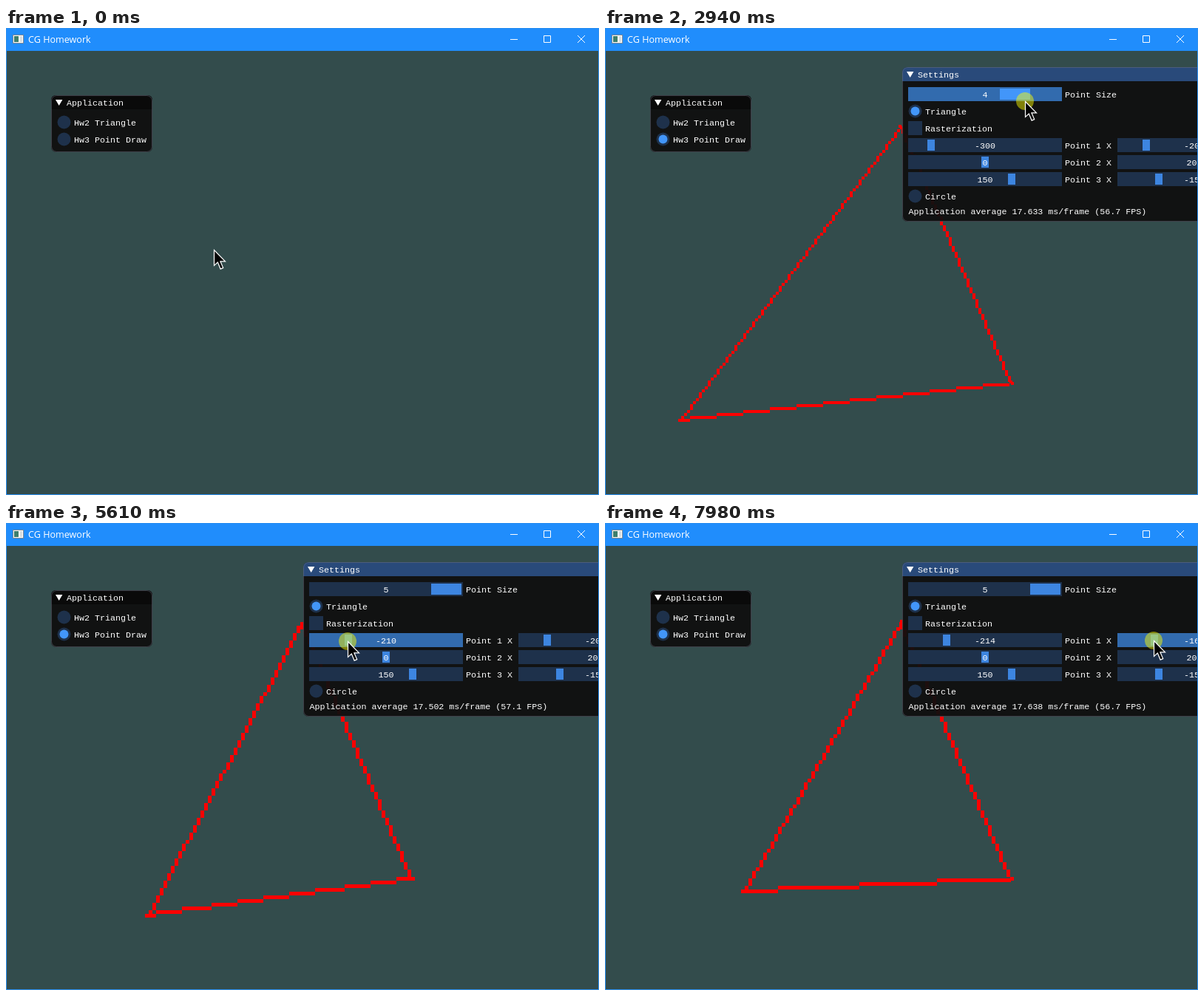
Write an HTML page that moves like this. It is 802 by 632 pixels and loops after 8 s.

```html
<!DOCTYPE html>
<html lang="en">
<head>
<meta charset="utf-8">
<title>CG Homework</title>
<style>
  html, body { margin: 0; width: 100%; height: 100%; overflow: hidden; background: #334c4c; }
  svg { display: block; width: 802px; height: 632px; }
  .mono { font: 11.667px "Liberation Mono", "Courier New", monospace; fill: #fff; white-space: pre; }
  .caption { font: 12.6px "Open Sans", "Noto Sans", sans-serif; fill: #fff; }
</style>
</head>
<body>
<svg id="stage" viewBox="0 0 802 632" xmlns="http://www.w3.org/2000/svg"></svg>
<script>
const LOOP = 8000, STEP = 156.5;
const LAG = 0.29; // a dragged slider trails the pointer by this part of a step
const FRAME = '#1e314b', HOVER = '#25476f', ACTIVE = '#326bae';
const GRAB = '#3d85e0', BRIGHT = '#4296fa';

const stage = document.getElementById('stage');

function add(parent, tag, attrs, text) {
  const el = document.createElementNS('http://www.w3.org/2000/svg', tag);
  for (const key in attrs) el.setAttribute(key, attrs[key]);
  if (text !== undefined) el.textContent = text;
  parent.appendChild(el);
  return el;
}
const rect = (p, x, y, width, height, fill, more) =>
  add(p, 'rect', { x, y, width, height, fill, ...more });
const label = (p, x, y, text, more) => add(p, 'text', { x, y, class: 'mono', ...more }, text);
const set = (el, key, value) => el.setAttribute(key, value);
const show = (el, on) => set(el, 'visibility', on ? 'visible' : 'hidden');

// Every control registers its hover area here.
const controls = [];
function control(el, x, y, w, inSettings) {
  const c = { el, x, y, w, h: 19, inSettings };
  controls.push(c);
  return c;
}

function panel(x, y, w, h, title, color) {
  const g = add(stage, 'g', {});
  rect(g, x, y, w, h, '#0f0f0f', { rx: 7, opacity: 0.94 });
  add(g, 'path', { fill: color, d: `M${x} ${y + 19}v-12q0 -7 7 -7h${w - 14}q7 0 7 7v12z` });
  rect(g, x + 0.5, y + 0.5, w - 1, h - 1, 'none', { rx: 7, stroke: '#6e6e80', 'stroke-opacity': 0.5 });
  add(g, 'path', { fill: '#fff', d: `M${x + 6} ${y + 6}h9.4l-4.7 8z` });
  label(g, x + 21, y + 14, title);
  return g;
}

function radio(g, x, y, text, width, inSettings) {
  const ring = add(g, 'circle', { cx: x + 9.5, cy: y + 9.5, r: 9, fill: FRAME });
  const dot = add(g, 'circle', { cx: x + 9.5, cy: y + 9.5, r: 6, fill: BRIGHT });
  label(g, x + 23, y + 14, text);
  control(ring, x, y, width, inSettings);
  return dot;
}

function slider(g, x, y, value, min, max, grabWidth = 10) {
  const room = 204 - grabWidth;
  const bar = rect(g, x, y, 208, 19, FRAME);
  const grab = rect(g, x, y + 2, grabWidth, 15, GRAB, { 'shape-rendering': 'crispEdges' });
  const text = label(g, x + 104, y + 14, '', { 'text-anchor': 'middle' });
  const c = control(bar, x, y, 208, true);
  c.grab = grab;
  c.start = value;
  c.put = v => {
    c.value = v;
    set(grab, 'x', x + 2 + (v - min) / (max - min) * room);
    text.textContent = v;
  };
  c.valueAt = px => {
    const part = (px - x - 2 - grabWidth / 2) / room;
    return Math.round(min + Math.max(0, Math.min(1, part)) * (max - min));
  };
  c.put(value);
  return c;
}

// Scene
rect(stage, 0, 0, 802, 632, '#334c4c');
const lines = add(stage, 'path', { fill: '#f00', 'shape-rendering': 'crispEdges' });

const app = panel(61, 91, 137, 77, 'Application', '#0a0a0a');
show(radio(app, 69, 118, 'Hw2 Triangle', 107), false);
const drawDot = radio(app, 69, 141, 'Hw3 Point Draw', 121);

const settings = panel(402, 53, 520, 209, 'Settings', '#294a7a');
const sizeBar = slider(settings, 410, 80, 1, 1, 5, 40.8);
label(settings, 622, 94, 'Point Size');
radio(settings, 410, 103, 'Triangle', 79, true);
control(rect(settings, 410, 126, 19, 19, FRAME), 410, 126, 114, true);
label(settings, 433, 140, 'Rasterization');
const corners = [[-300, -200], [0, 200], [150, -150]].map(([px, py], i) => {
  const y = 149 + 23 * i;
  label(settings, 622, y + 14, `Point ${i + 1} X`);
  return [slider(settings, 410, y, px, -400, 400), slider(settings, 693, y, py, -300, 300)];
});
show(radio(settings, 410, 218, 'Circle', 65, true), false);
const stats = label(settings, 410.5, 252, '');

// Window frame
rect(stage, 0, 0, 802, 31, '#208dfc');
rect(stage, 0.5, 0.5, 801, 631, 'none', { stroke: '#2b8ff0' });
rect(stage, 9.5, 9.5, 14, 11, '#fff', { stroke: '#7b8794' });
rect(stage, 11, 11, 6, 8, '#3f7f6c');
rect(stage, 19, 11, 3, 8, '#d8dde0');
add(stage, 'text', { x: 30, y: 20, class: 'caption' }, 'CG Homework');
add(stage, 'path', {
  d: 'M682 15.5h10M727.5 10.5h9v9h-9zM773 10l10 10M783 10l-10 10', fill: 'none', stroke: '#fff'
});

const halo = add(stage, 'circle', { r: 12, fill: '#ff0', 'fill-opacity': 0.47 });
const pointer = add(stage, 'path', {
  d: 'M0 0V21L4.8 16.6L8.6 25.6L12.2 24.1L8.4 15.3H15Z',
  fill: '#000', stroke: '#fff', 'stroke-width': 1.2
});

// Pointer stops: step, x, y
const path = [
  [1, 281, 300], [4, 92, 152], [6, 92, 152], [11, 423, 152],
  [17, 440, 92], [19, 568, 99], [21, 602, 94],
  [25, 441.25, 156], [26, 441.25, 156], [29, 492, 156], [31.5, 500, 157],
  [35, 476, 160], [35.6, 463.6, 160], [36, 462, 160], [39, 462, 160],
  [41.5, 732.3, 159], [43, 734, 159], [45, 776, 160], [47, 782, 160], [49, 749, 160], [51, 742, 159]
];
const frameTime = [[11, 17.364], [19, 17.633], [29, 17.077], [36, 17.502], [45, 18.056], [51, 17.638]];
const drags = [
  { bar: sizeBar, from: 17, to: 21 },
  { bar: corners[0][0], from: 26, to: 38 },
  { bar: corners[0][1], from: 42, to: 51 }
];

function at(keys, n, col = 1) {
  const next = keys.findIndex(k => k[0] >= n);
  if (next < 0) return keys[keys.length - 1][col];
  if (next === 0) return keys[0][col];
  const a = keys[next - 1], b = keys[next];
  return a[col] + (b[col] - a[col]) * (n - a[0]) / (b[0] - a[0]);
}

// Bresenham walk in blocks of the point size
function edge([x0, y0], [x1, y1], size) {
  const dx = x1 - x0, dy = y1 - y0;
  const flat = Math.abs(dx) >= Math.abs(dy);
  const long = Math.max(Math.abs(dx), Math.abs(dy));
  const short = Math.min(Math.abs(dx), Math.abs(dy));
  let d = '';
  for (let i = 0; i * size < long; i++) {
    const j = i ? Math.ceil((i + 1) * short / long - 0.5) : 0;
    const x = x0 + Math.sign(dx) * size * (flat ? i : j);
    const y = y0 + Math.sign(dy) * size * (flat ? j : i);
    d += `M${x - Math.ceil(size / 2)} ${y - Math.floor(size / 2)}h${size}v${size}h${-size}z`;
  }
  return d;
}

function draw(n) {
  const x = at(path, n), y = at(path, n, 2);
  const open = n >= 6;
  let held = null;

  for (const { bar, from, to } of drags) {
    bar.put(n < from ? bar.start : bar.valueAt(at(path, Math.min(n, to) - LAG)));
    if (n >= from && n <= to) held = bar;
  }

  for (const el of [drawDot, settings, lines]) show(el, open);
  show(halo, held || n === 5);
  set(halo, 'cx', x);
  set(halo, 'cy', y);
  set(pointer, 'transform', `translate(${x + 0.5} ${y + 0.5})`);

  for (const c of controls) {
    const over = !held && (open || !c.inSettings) &&
      x >= c.x && x < c.x + c.w && y >= c.y && y < c.y + c.h;
    set(c.el, 'fill', c === held ? ACTIVE : over ? HOVER : FRAME);
    if (c.grab) set(c.grab, 'fill', c === held ? BRIGHT : GRAB);
  }

  const [a, b, c] = corners.map(([px, py]) => [401 + px.value, 331 - py.value]);
  const size = sizeBar.value;
  set(lines, 'd', edge(a, b, size) + edge(c, b, size) + edge(a, c, size));

  const ms = at(frameTime, n);
  stats.textContent =
    `Application average ${ms.toFixed(3)} ms/frame (${(1000 / ms).toFixed(1)} FPS)`;
}

const begin = performance.now();
let last = -1;
function tick() {
  const t = (performance.now() - begin) % LOOP;
  const n = Math.floor(t / STEP + 0.26);
  if (n !== last) draw(last = n);
  requestAnimationFrame(tick);
}
tick();
</script>
</body>
</html>
```
